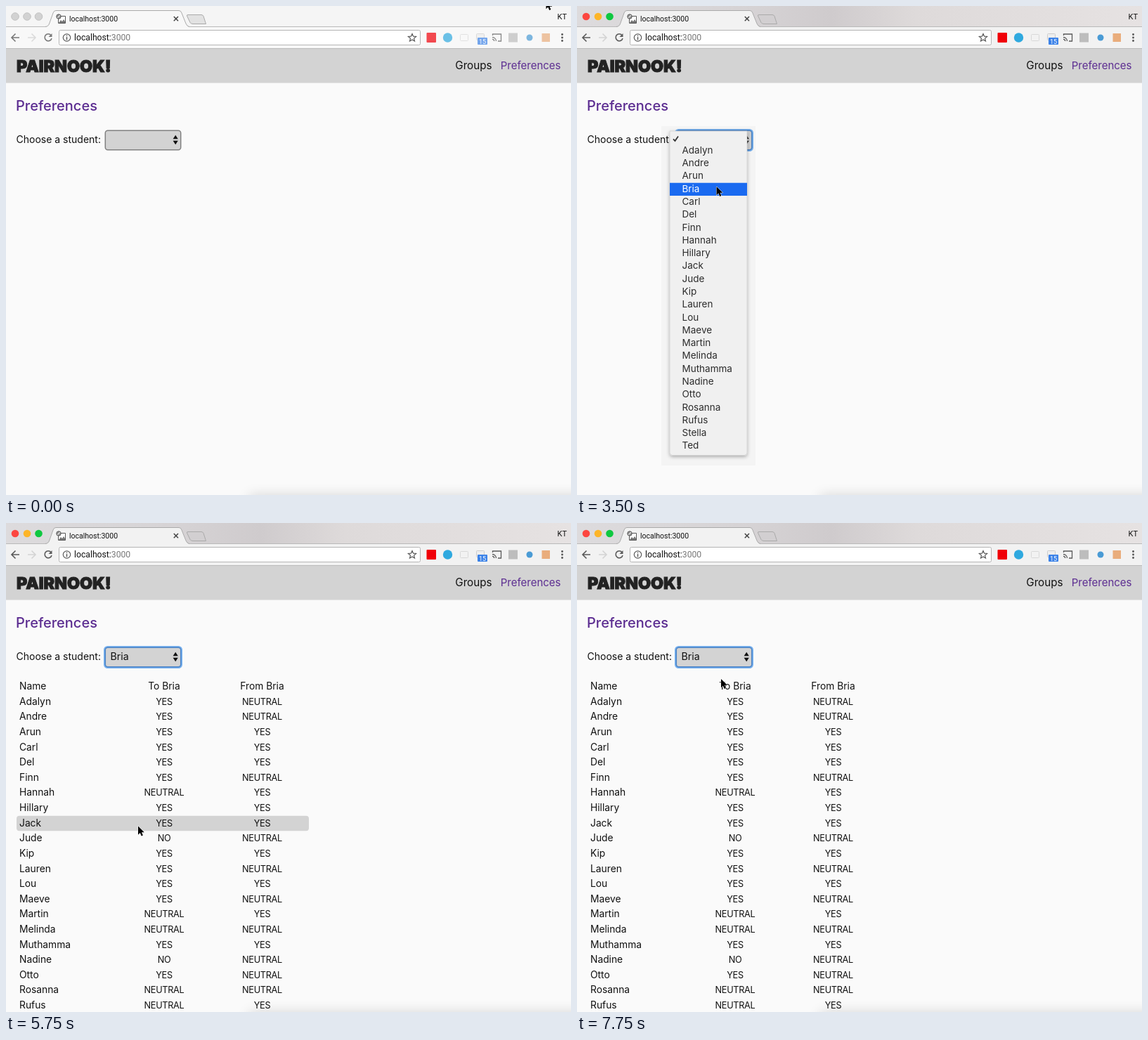
Animation of 804x696 px, one loop 8000 ms. Source, as an HTML page:

```html
<!DOCTYPE html>
<html lang="en">
<head>
<meta charset="utf-8">
<title>Preferences</title>
<style>
html, body { margin: 0; width: 100%; height: 100%; overflow: hidden; background: #fafafa; }
svg { display: block; width: 804px; height: 696px; }
text { font-family: Inter, "Open Sans", sans-serif; fill: #111; white-space: pre; }
.ui { font-family: Roboto, "Liberation Sans", sans-serif; }
.purple { fill: #5c2d91; }
.list text { font-size: 13.5px; fill: #2c2c2c; }
.table text { font-size: 13.8px; }
.table .mark { font-size: 12.7px; letter-spacing: -.3px; }
.mid { text-anchor: middle; }
.end { text-anchor: end; }
.line { fill: none; stroke: #5a5a5a; stroke-width: 1.6; }
</style>
</head>
<body>
<svg viewBox="0 0 804 696">
  <defs>
    <linearGradient id="strip">
      <stop offset="0" stop-color="#dddbdd"/><stop offset=".3" stop-color="#d6d3d5"/>
      <stop offset=".45" stop-color="#cfcbcd"/><stop offset=".6" stop-color="#dedada"/>
      <stop offset="1" stop-color="#e6e2e2"/>
    </linearGradient>
    <filter id="soft" x="-20%" y="-100%" width="140%" height="300%"><feGaussianBlur stdDeviation="9"/></filter>
    <filter id="glow" x="-20%" y="-40%" width="140%" height="180%"><feGaussianBlur stdDeviation=".5"/></filter>
    <filter id="drop" x="-20%" y="-5%" width="140%" height="110%">
      <feDropShadow dx="0" dy="2" stdDeviation="2.5" flood-opacity=".3"/>
    </filter>
  </defs>
  <rect width="804" height="696" fill="#fafafa"/>

  <!-- browser window -->
  <rect id="bar" width="804" height="30"/>
  <rect id="tools" y="29" width="804" height="31"/>
  <path d="M0 29.5H804" stroke="#b9b9b9"/>
  <path id="tab" d="M56 30C60 29 61 27 62 24L67 10Q68 6.500 71 6.500H246Q249 6.500 250 10L256 25Q257.500 29 261 30"/>
  <path d="M56 29.500C60 29 61 27 62 24L67 10Q68 6.500 71 6.500H246Q249 6.500 250 10L256 25Q257.500 29 261 29.500" fill="none" stroke="#aaa"/>
  <path id="plus" d="M259 12.500H278Q280 12.500 281 14.500L284.500 25.500H266Q263 25.500 262 23.500L257.500 14Q257 12.500 259 12.500Z" stroke="#aaa"/>
  <g id="lights"><circle cx="13" cy="15" r="5.300"/><circle cx="30" cy="15" r="5.300"/><circle cx="46.500" cy="15" r="5.300"/></g>
  <path d="M74.500 14.500H84.500V24.500H74.500Z" fill="#fff" stroke="#555"/>
  <path d="M75 24L78 20 80 22 82 19 84 22V24Z" fill="#777"/>
  <circle cx="75" cy="15" r="3.200" fill="#999" stroke="#555"/>
  <path d="M73 17L77 13" stroke="#fff"/>
  <text class="ui" x="90" y="22" font-size="10.5">localhost:3000</text>
  <path d="M238.800 15L245 21.200M245 15L238.800 21.200" stroke="#444" stroke-width="1.500"/>
  <text class="ui end" x="798" y="19" font-size="11">KT</text>

  <g id="nav">
    <path class="line" d="M19 45H8M13.500 39.500L8 45L13.500 50.500"/>
    <path class="line" d="M31 45H42M36.500 39.500L42 45L36.500 50.500" style="stroke:#d4d4d4"/>
    <path class="line" d="M64 41.500A5 5 0 1 0 65 46"/><path d="M65.500 39V44H60.500Z" fill="#5a5a5a"/>
  </g>
  <rect x="75.500" y="34.500" width="514" height="21" rx="2" fill="#fff" stroke="#b4b4b4"/>
  <circle class="line" cx="86.500" cy="45" r="5.200" style="stroke-width:1.2"/>
  <path d="M86.500 44V48.200M86.500 41.700V43" stroke="#555" stroke-width="1.400"/>
  <text class="ui" x="97" y="49" font-size="12.2">localhost:<tspan fill="#777" style="fill:#777">3000</tspan></text>
  <path class="line" d="M578 39.500L579.600 43.200 583.600 43.500 580.500 46.100 581.500 50 578 47.900 574.500 50 575.500 46.100 572.400 43.500 576.400 43.200Z" style="stroke-width:1.2"/>
  <g id="icons">
    <rect x="598.500" y="38" width="13.500" height="14" rx="1" fill="#f00008"/>
    <circle cx="628.500" cy="45" r="6.700" fill="#2fa9df"/>
    <rect x="646.500" y="40.500" width="11" height="9" rx="1" fill="none" stroke="#d8d8d8"/>
    <rect x="669.500" y="39.500" width="11" height="9" rx="1" fill="#eee" stroke="#ccc"/>
    <rect x="671" y="45" width="14" height="10" rx="1" fill="#3b82e8"/>
    <text class="ui mid" x="678" y="53.500" font-size="9" style="fill:#fff">15</text>
    <path class="line" d="M692.500 42V40H704.500V50H700M692 44.500A5.500 5.500 0 0 1 697.500 50M692 47.300A2.700 2.700 0 0 1 694.700 50" style="stroke-width:1.3"/>
    <rect x="715" y="38.500" width="13" height="13" fill="#bdbdbd"/>
    <circle cx="745" cy="45" r="4.500" fill="#4a9bd5"/>
    <rect x="762.500" y="39" width="11.500" height="12" fill="#e9ad7c"/>
  </g>
  <g fill="#555"><circle cx="791.500" cy="40.500" r="1.400"/><circle cx="791.500" cy="45" r="1.400"/><circle cx="791.500" cy="49.500" r="1.400"/></g>

  <!-- page -->
  <rect y="60" width="804" height="49.500" fill="#d3d3d3"/>
  <path d="M0 60.500H804" stroke="#bcbcbc"/>
  <text x="15" y="93.500" font-size="23.3" font-weight="900" style="fill:#222;stroke:#222;stroke-width:1">PAIRNOOK!</text>
  <text class="end" x="691.500" y="90" font-size="15.2">Groups</text>
  <text class="end purple" x="789.500" y="90" font-size="15">Preferences</text>
  <text class="purple" x="14" y="149.300" font-size="20" font-weight="500">Preferences</text>
  <text x="14.500" y="195" font-size="14">Choose a student:</text>
  <rect id="ring" x="140.500" y="176.500" width="109" height="29" rx="4" fill="none" stroke="#78b2f0" stroke-width="3" filter="url(#glow)"/>
  <rect id="select" x="141.300" y="177.300" width="107.400" height="27.400" rx="3.500" fill="#d3d3d3" stroke-width="1.500"/>
  <path d="M237.600 189.200L241.200 183.800L244.800 189.200ZM237.600 191.800L241.200 197.200L244.800 191.800Z" fill="#111"/>
  <text id="choice" x="148.500" y="194.600" font-size="14.2"></text>

  <g id="table" class="table"><rect id="hover" x="15" width="416" height="21.600" rx="4" fill="#d3d3d3"/></g>

  <g id="menu" class="list">
    <rect x="120" y="171" width="134" height="483" fill="#000" opacity=".025"/>
    <path d="M132 178H242V635.500Q242 639.500 238 639.500H136Q132 639.500 132 635.500Z" fill="#f0f0f0" stroke="#c8c8c8" stroke-width=".6" filter="url(#drop)"/>
    <rect id="pick" x="132" width="110" fill="#1a6af0"/>
    <path id="check" d="M137 189.300L139.500 192L144 185.500" fill="none" stroke-width="1.800"/>
  </g>

  <rect x="346" y="696" width="520" height="60" opacity=".14" filter="url(#soft)"/>
  <path id="cursor" d="M0 0V12.200L2.800 9.600L4.700 14L6.900 13L5 8.800H8.800Z" fill="#000" stroke="#fff" stroke-width="1" paint-order="stroke"/>
</svg>
<script>
const LOOP = 8000;
const CHOSEN = 'Bria';
const names = ('Adalyn Andre Arun Bria Carl Del Finn Hannah Hillary Jack Jude Kip Lauren Lou Maeve ' +
  'Martin Melinda Muthamma Nadine Otto Rosanna Rufus Stella Ted').split(' ');
const marks = { Y: 'YES', N: 'NEUTRAL', X: 'NO' };
const given = 'YYYYYYNYYXYYYYNNYXYNN';
const received = 'NNYYYNYYYNYNYNYNYNNNY';
const ITEM = 18.28, ROW = 21.62;

const $ = id => document.getElementById(id);
const set = (id, attrs) => { for (const k in attrs) $(id).setAttribute(k, attrs[k]); };
const show = (id, on) => { $(id).style.display = on ? '' : 'none'; };

function addText(parent, x, y, label, cls = '') {
  const el = document.createElementNS('http://www.w3.org/2000/svg', 'text');
  el.setAttribute('x', x);
  el.setAttribute('y', y);
  el.setAttribute('class', cls);
  el.textContent = label;
  $(parent).append(el);
  return el;
}

const items = names.map((name, i) => addText('menu', 149.5, 209.9 + ITEM * i, name));

addText('table', 19, 237, 'Name');
addText('table', 225, 237, 'To ' + CHOSEN, 'mid');
addText('table', 364.5, 237, 'From ' + CHOSEN, 'mid');
names.filter(n => n !== CHOSEN).slice(0, given.length).forEach((name, i) => {
  const y = 258.7 + ROW * i;
  addText('table', 19, y, name);
  addText('table', 225, y, marks[given[i]], 'mid mark');
  addText('table', 364.5, y, marks[received[i]], 'mid mark');
});

// Pointer samples: time, x, y
const pointer = [
  [0, 768.5, -8], [500, 726, 3], [750, 277, 154], [1000, 225, 181], [1250, 198.5, 194],
  [3000, 198.5, 230.5], [3250, 198.5, 250.5], [3500, 198.5, 257], [3750, 198.5, 258],
  [5250, 198.5, 259], [5500, 194, 328.5], [5750, 188, 431.5], [6000, 183, 549],
  [6250, 182.5, 553], [7250, 188, 468], [7500, 196, 378], [7750, 205, 222]
];
// Highlighted menu item: -1 is the blank entry, null is none
const picks = [[0, null], [2500, -1], [3000, 1], [3250, 2], [3500, 3], [4000, null]];
// Highlighted table row
const hovers = [[0, null], [5250, 0], [5500, 3], [5750, 8], [6000, 13], [6250, 14], [7250, 10], [7500, 6], [7750, null]];

const at = (track, t) => track.filter(step => step[0] <= t).pop();

function drawWindow(active) {
  set('bar', { fill: active ? 'url(#strip)' : '#f5f5f5' });
  set('tools', { fill: active ? '#f2f2f2' : '#f8f8f8' });
  set('tab', { fill: active ? '#f2f2f2' : '#f8f8f8' });
  set('plus', { fill: active ? '#d2cfd1' : '#e2e2e2' });
  const colours = active ? ['#fc4640', '#fdb528', '#0fc840'] : ['#d2d2d2', '#d2d2d2', '#d2d2d2'];
  [...$('lights').children].forEach((c, i) => {
    c.setAttribute('fill', colours[i]);
    c.setAttribute('stroke', active ? 'none' : '#c2c2c2');
  });
  set('icons', { opacity: active ? 1 : .7 });
  set('nav', { opacity: active ? 1 : .8 });
}

function drawMenu(t) {
  const open = t >= 2500 && t < 4250;
  const pick = at(picks, t)[1];
  show('menu', open);
  show('pick', pick !== null);
  if (pick !== null) {
    set('pick', pick < 0 ? { y: 181.8, height: 15.2 } : { y: 196.9 + ITEM * pick, height: ITEM });
  }
  set('check', { stroke: pick === -1 ? '#fff' : '#333' });
  items.forEach((el, i) => { el.style.fill = i === pick ? '#fff' : ''; });
}

function draw(t) {
  drawWindow(t >= 1500);
  drawMenu(t);
  show('ring', t >= 2500);
  set('select', { stroke: t >= 2500 ? '#4c83c4' : '#808080' });
  $('choice').textContent = t >= 4500 ? CHOSEN : '';

  const row = at(hovers, t)[1];
  show('table', t >= 4500);
  show('hover', row !== null);
  if (row !== null) set('hover', { y: 243.7 + ROW * row });

  const [, x, y] = at(pointer, t);
  set('cursor', { transform: `translate(${x} ${y})` });
}

const start = performance.now();
function tick() {
  draw((performance.now() - start) % LOOP);
  requestAnimationFrame(tick);
}
tick();
</script>
</body>
</html>
```
